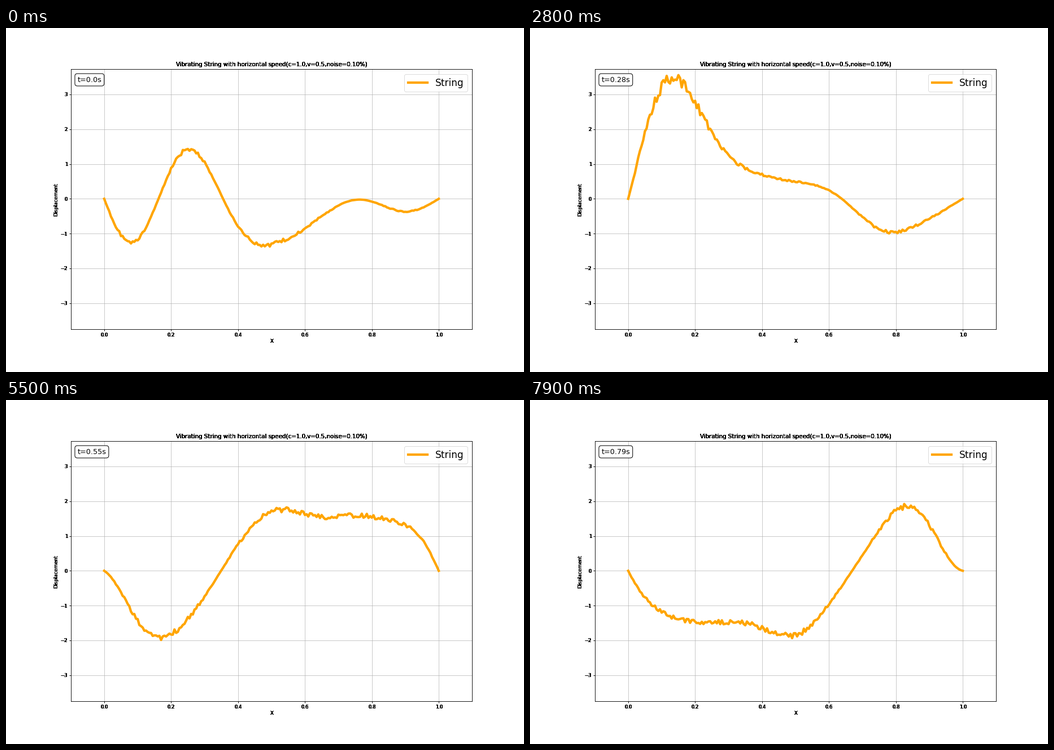
Write a matplotlib script that moves like this. It is 917 px wide and 611 px high and loops after 8000 ms.

```python
import numpy as np
import matplotlib.pyplot as plt
from matplotlib.animation import FuncAnimation

W, H, DPI = 917, 611, 61.13
FRAMES, STEP_MS = 80, 100
C, V = 1.0, 0.5
NOISE = 0.045

plt.rcParams["font.family"] = "DejaVu Sans"

# One turn of the travelling pulse, evenly spaced
KEYS = [0, -.66, 1.19, 2.92, 2.18, .84, .48, .75,
        1.17, 1.41, 1.11, .83, 1.05, 1.44, 1.79, 1.50]
PULSE = np.fft.rfft(KEYS)[1:8] * 2 / len(KEYS)
BACK, FORTH = C - V, C + V
PERIOD = 1 + BACK / FORTH


def pulse(s):
    """Smooth periodic curve through the key points, without its mean."""
    k = 2 * np.pi / PERIOD * np.arange(1, 8)
    return (np.exp(1j * np.outer(s, k)) @ PULSE).real


def displacement(x, t):
    """Wave running left plus its reflection running right; zero at both ends."""
    return pulse(x + BACK * t) - pulse(BACK * t - x * BACK / FORTH)


fig = plt.figure(figsize=(W / DPI, H / DPI), dpi=DPI, facecolor="white")
ax = fig.add_axes([0.125, 0.125, 0.775, 0.755])
ax.set(xlim=(-0.1, 1.1), ylim=(-3.742, 3.722),
       xticks=np.arange(6) / 5, yticks=range(-3, 4))
ax.tick_params(labelbottom=False, labelleft=False, width=1.1)
ax.grid(True)
for spine in ax.spines.values():
    spine.set_linewidth(1.05)


def heavy_text(px, py, s, size=10, **kw):
    """Overprint a label so that its soft edges fill in."""
    for _ in range(9):
        fig.text(px / W, 1 - py / H, s, fontsize=size, **kw)


for i in range(6):
    heavy_text(174.2 + 118.45 * i, 540.6, f"{i / 5:.1f}", ha="center", va="top")
for v in range(-3, 4):
    heavy_text(109, 303.35 - 61.8 * v, str(v).replace("-", "\u2212"),
               ha="right", va="center_baseline")
heavy_text(470.2, 68.2, "Vibrating String with horizontal speed(c=1.0,v=0.5,noise=0.10%)",
           size=12, ha="center", va="baseline")
heavy_text(470.2, 552, "X", ha="center", va="top")
heavy_text(93.1, 304.5, "Displacement", rotation=90, ha="right", va="center")

x = np.linspace(0, 1, 201)
line, = ax.plot([], [], color="orange", lw=5, label="String")
ax.legend(loc="upper right", fontsize=20)
clock = fig.text(126.4 / W, 1 - 95.5 / H, "", fontsize=15, va="baseline",
                 bbox=dict(boxstyle="round,pad=0.35", fc="white", ec="black", lw=1.2))


def update(i):
    t = i / 100
    jitter = np.random.default_rng(100 + i).uniform(-NOISE, NOISE, x.size)
    line.set_data(x, displacement(x, t) * (1 + jitter))
    clock.set_text(f"t={t}s")
    return line, clock


anim = FuncAnimation(fig, update, frames=FRAMES, interval=STEP_MS,
                     init_func=lambda: update(0), repeat=True, repeat_delay=0)
plt.show()
```
